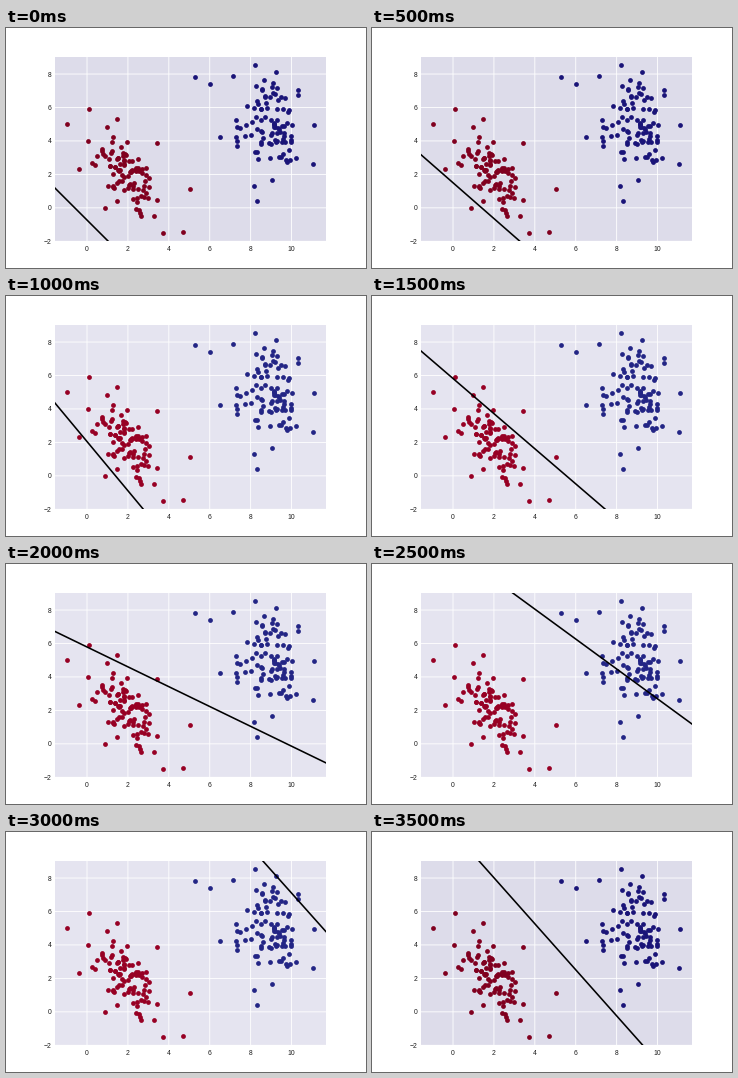
These frames come from a looping animation (360x240 px, 4000 ms). A matplotlib script:

```python
import numpy as np
import matplotlib.pyplot as plt
from matplotlib.animation import FuncAnimation

W, H, DPI = 360, 240, 120
PX = 72 / DPI                       # points per pixel
LEFT, RIGHT, TOP, BOTTOM = 48.8, 319.8, 28.8, 213.3
X_RANGE = -1.575, 11.675
Y_RANGE = -2.0, 9.03

# panel, red class, blue class
DEEP = ("#dddcea", "#80001f", "#1a1478")
SOFT = ("#e5e4f0", "#970024", "#232585")

# decision boundary after each training step: slope, intercept
BOUNDARIES = [(-1.22, -0.73), (-1.07, 1.50), (-1.47, 2.05), (-1.05, 5.82),
              (-0.593, 5.79), (-0.894, 11.63), (-1.37, 20.8), (-1.376, 10.77)]

# the few samples that lie far from their class
RED_FAR = [(-1, 5), (0.1, 5.9), (-0.4, 2.35), (0.9, 0), (1.45, 5.3),
           (3.4, 3.85), (3.7, -1.5), (4.7, -1.45), (5.05, 1.1)]
BLUE_FAR = [(5.3, 7.8), (6, 7.4), (7.15, 7.9), (8.2, 8.55), (9.25, 8.15),
            (6.5, 4.25), (7.35, 3.7), (8.3, 0.4), (8.15, 1.3), (9.05, 1.65),
            (11.05, 2.65)]


def cloud(rng, count, mean, spread, corr=0, limit=2.0):
    """Correlated normal samples, without the far tails."""
    z = rng.normal(size=(4 * count, 2))
    x, y = z[np.hypot(*z.T) < limit][:count].T
    y = corr * x + np.sqrt(1 - corr ** 2) * y
    return np.array(mean) + np.column_stack([x, y]) * spread


plt.rcParams["font.family"] = "Liberation Sans"
fig = plt.figure(figsize=(W / DPI, H / DPI), dpi=DPI, facecolor="white")
ax = fig.add_axes([LEFT / W, 1 - BOTTOM / H,
                   (RIGHT - LEFT) / W, (BOTTOM - TOP) / H])
ax.set(xlim=X_RANGE, ylim=Y_RANGE,
       xticks=range(0, 11, 2), yticks=range(-2, 9, 2))
ax.spines[:].set_visible(False)
ax.set_axisbelow(True)
ax.grid(color="white", lw=0.85 * PX, snap=False)
ax.tick_params(length=0, labelsize=6.8 * PX, labelcolor="#1c1c1c")
ax.tick_params(axis="x", pad=4.4 * PX)
ax.tick_params(axis="y", pad=3.2 * PX)

rng = np.random.default_rng(12)
red_xy = np.vstack([RED_FAR, cloud(rng, 92, (1.85, 2.1), (0.95, 1.4), -0.65)])
blue_xy = np.vstack([BLUE_FAR, cloud(rng, 90, (9.0, 5.1), (1.05, 1.35))])
dots = dict(ls="none", marker="o", ms=4.8 * PX, mew=0, zorder=3)
red, = ax.plot(*red_xy.T, **dots)
blue, = ax.plot(*blue_xy.T, **dots)
boundary, = ax.plot([], [], color="black", lw=1.6 * PX, zorder=4)


def draw(step):
    slope, intercept = BOUNDARIES[step]
    x = np.array(X_RANGE)
    boundary.set_data(x, slope * x + intercept)
    back, warm, cool = SOFT if 2 <= step <= 6 else DEEP
    ax.set_facecolor(back)
    red.set_color(warm)
    blue.set_color(cool)
    return red, blue, boundary


anim = FuncAnimation(fig, draw, frames=len(BOUNDARIES), interval=500,
                     repeat=True, repeat_delay=0, blit=False)
plt.show()
```
